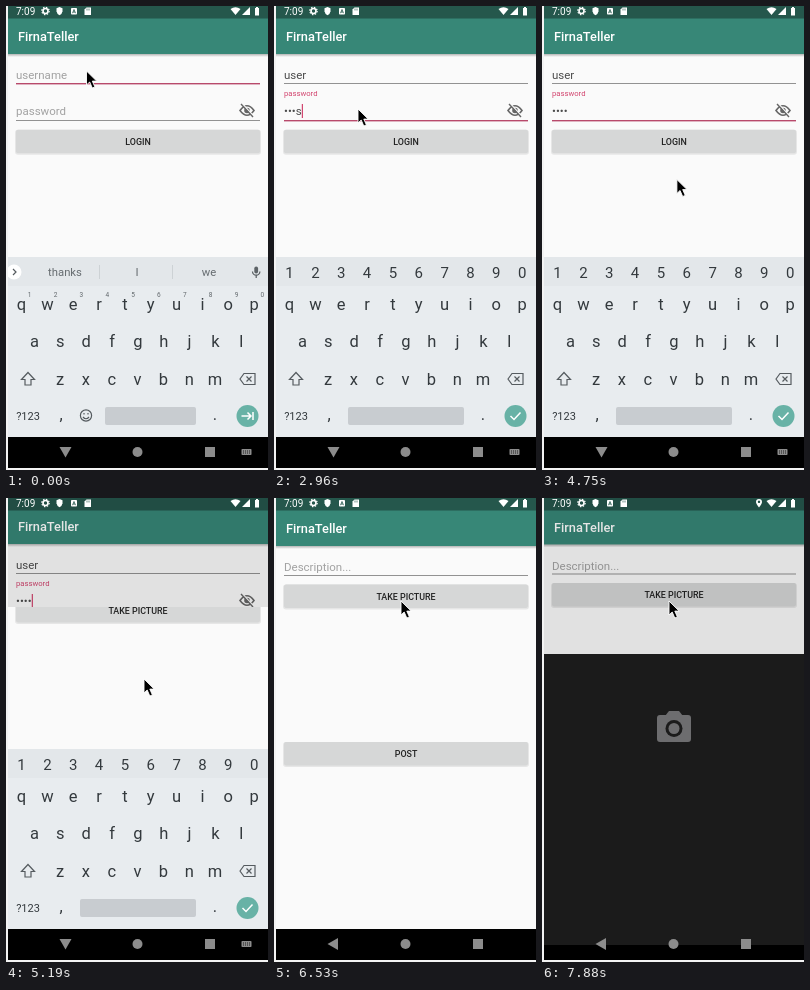
Recreate the animation shown at these times as an HTML page. Size 262 by 464 pixels, loop 8 s.

```html
<!DOCTYPE html>
<html lang="en">
<head>
<meta charset="utf-8">
<title>Login demo</title>
<style>
html, body { margin: 0; width: 100%; height: 100%; overflow: hidden; background: #f3f3f3; }
svg { display: block; width: 262px; height: 464px; font-family: Roboto, "Noto Sans", sans-serif; }
text { white-space: pre; }
.title { font-size: 12.8px; font-weight: 500; fill: #fff; }
.field { font-size: 11.5px; fill: #4c4c4c; }
.hint { font-size: 11.5px; fill: #a2a2a2; }
.caption { font-size: 8.9px; font-weight: 500; fill: #222; text-anchor: middle; }
.key { font-size: 16.5px; fill: #33393d; text-anchor: middle; }
.digit { font-size: 15px; fill: #33393d; text-anchor: middle; }
.sup { font-size: 6.5px; fill: #62686c; text-anchor: middle; }
.word { font-size: 11.3px; fill: #666c70; text-anchor: middle; }
.icon { fill: none; stroke: #555b5f; stroke-width: 1.2; }
.caret { fill: #d2456f; }
</style>
</head>
<body>
<svg viewBox="0 0 262 464">
  <defs>
    <linearGradient id="shade" x2="0" y2="1">
      <stop stop-color="#000" stop-opacity=".28"/>
      <stop offset="1" stop-color="#000" stop-opacity="0"/>
    </linearGradient>
    <clipPath id="phone"><rect x="2" width="260" height="462"/></clipPath>
    <clipPath id="reveal"><rect id="revealBox" x="2" width="260" height="464"/></clipPath>
    <g id="appBar">
      <rect x="2" y="-10" width="260" height="58" fill="#378777"/>
      <rect x="2" y="48" width="260" height="3" fill="url(#shade)"/>
      <text class="title" x="12" y="35.3">FirnaTeller</text>
    </g>
  </defs>

  <g clip-path="url(#phone)">
    <rect x="2" width="260" height="464" fill="#fafafa"/>

    <g id="login">
      <rect x="2" y="0" width="260" height="464" fill="#fafafa"/>
      <use href="#appBar"/>
      <text id="userHint" class="hint" x="10" y="73">username</text>
      <text id="user" class="field" x="10" y="73"></text>
      <rect id="compose" x="10" y="74" height="1" fill="#555"/>
      <rect id="userLine" x="10" width="244"/>
      <rect id="userCaret" class="caret" y="61" width="1.2" height="15"/>
      <text id="passHint" x="10">password</text>
      <text id="pass" class="field" x="10" y="108.5"></text>
      <rect id="passLine" x="10" width="244"/>
      <rect id="passCaret" class="caret" y="98" width="1.2" height="14"/>
      <g fill="none" stroke="#666" stroke-width="1.6">
        <path d="M234 104.5q7-9.5 14 0q-7 9.500-14 0z"/>
        <circle cx="241" cy="104.500" r="2" fill="#666"/>
        <path d="M236 97.500l12 13" stroke="#fafafa" stroke-width="1.500"/>
        <path d="M235 98l12 13" stroke-width="1.400"/>
      </g>
      <g id="loginButton"></g>
    </g>

    <g id="post">
      <g id="postBody">
        <rect x="2" width="260" height="464" fill="#fafafa"/>
        <use href="#appBar"/>
        <text class="hint" x="10" y="73">Description...</text>
        <rect x="10" y="77" width="244" height="1" fill="#929292"/>
        <g id="takeButton"></g>
        <g id="postButton"></g>
      </g>
    </g>
    <rect id="dim" x="2" width="260" height="464" opacity=".1"/>
    <use id="front" href="#post"/>

    <g id="keyboard">
      <rect x="2" y="251" width="260" height="180" fill="#e8ecef"/>
      <rect x="2" y="251" width="260" height="29" fill="#e3e7ea"/>
      <g id="letters"></g>
      <g id="wordKeys">
        <g id="sups"></g>
        <circle cx="8" cy="266" r="7.500" fill="#fff"/>
        <path class="icon" d="M7 263l3 3-3 3"/>
        <path d="M93.500 259v14M166.500 259v14" stroke="#cdd2d5"/>
        <text class="word" x="59" y="270"></text>
        <text class="word" x="131" y="270"></text>
        <text class="word" x="203" y="270"></text>
        <rect x="248.300" y="260.500" width="3.800" height="7" rx="1.900" fill="#5d6367"/>
        <path class="icon" d="M246.500 265.500a3.700 3.700 0 0 0 7.400 0M250.200 269v3"/>
        <g class="icon">
          <circle cx="80" cy="409.500" r="5.600"/>
          <path d="M77 411q3 3.500 6 0M78 407v1.600M82 407v1.600"/>
        </g>
      </g>
      <g id="digits"></g>
      <path class="icon" d="M22 366.500l6.500 7h-3.500v5.500h-6v-5.500h-3.500z"/>
      <path class="icon" d="M234 373l4-5.500h11v11h-11zM240.500 370.500l5 5M245.500 370.500l-5 5"/>
      <text x="22" y="413.500" class="word" style="fill:#33393d;font-size:11px">?123</text>
      <text x="55" y="414" class="key">,</text>
      <text x="209" y="414" class="key">.</text>
      <rect id="space" y="401" height="18" rx="2" fill="#c8ccd0"/>
      <circle cx="241.500" cy="410" r="11" fill="#68b2a6"/>
      <path id="action" fill="none" stroke="#fff" stroke-width="1.500"/>
    </g>

    <g id="camera">
      <rect x="2" y="156" width="260" height="291" fill="#1b1b1b"/>
      <rect x="115" y="217" width="34" height="27" rx="3" fill="#6d6d6f"/>
      <path d="M123 218l4-5h10l4 5z" fill="#6d6d6f"/>
      <circle cx="132" cy="230.500" r="8.500" fill="#1b1b1b"/>
      <circle cx="132" cy="230.500" r="5.500" fill="#6d6d6f"/>
    </g>

    <rect id="navBack" x="2" y="431" width="260" height="31"/>
    <g fill="#8c8c8c">
      <path id="back"/>
      <circle cx="131.500" cy="446" r="5"/>
      <rect x="199" y="441" width="10" height="10"/>
      <g id="switcher">
        <rect x="235.500" y="443" width="10" height="6" rx=".8"/>
        <path d="M237 445h7M237 447h7" stroke="#000" stroke-width=".8" stroke-dasharray="1 1"/>
      </g>
    </g>

    <rect id="status" x="2" width="260" height="12.500"/>
    <g fill="#fff">
      <text x="10" y="9" font-size="10">7:09</text>
      <circle cx="39.500" cy="5" r="2.500" fill="none" stroke="#fff" stroke-width="1.600"/>
      <circle cx="39.500" cy="5" r="3.700" fill="none" stroke="#fff" stroke-width="1.200" stroke-dasharray="1.450 1.450"/>
      <path d="M50.500 2.200l3-1.200 3 1.200v3q-.5 3-3 4-2.500-1-3-4z"/>
      <rect x="65" y="2" width="6" height="6.500" rx=".8"/>
      <path d="M66.500 7.200l1.500-3.700 1.500 3.700M67 6h2" fill="none" stroke="#25574c" stroke-width=".8"/>
      <path d="M80.500 1.500h4.500v7.500h-6.500v-5.500z"/>
      <path d="M81 2.500v2M83 2.500v2" stroke="#25574c" stroke-width=".7"/>
      <path d="M224.500 3q5-3.500 10 0l-5 6z"/>
      <path d="M244 1v8h-8z"/>
      <path d="M249 2h1v-1h2v1h1v7.500h-4z"/>
      <path id="pin" fill-rule="evenodd" d="M217 9.500q-3-4-3-5.500a3 3 0 0 1 6 0q0 1.500-3 5.500zM217 2.600a1.200 1.200 0 1 0 .01 0z"/>
    </g>
  </g>
  <rect y="462" width="262" height="2" fill="#f3f3f3"/>
  <path id="mouse" d="M0 0v14l3.200-3 2.600 6 2.600-1.100-2.600-5.800h4.400z" stroke="#fff" stroke-width=".9"/>
</svg>

<script>
const LOOP = 8000, STEP = 150;
const $ = id => document.getElementById(id);
const set = (el, attrs) => { for (const k in attrs) el.setAttribute(k, attrs[k]); };
const show = (id, on) => { $(id).style.display = on ? "" : "none"; };

// Latest value of a track of [time, value] pairs.
const at = (t, track) => track.reduce((v, [from, next]) => t >= from ? next : v, track[0][1]);

// Keyboard
const keyX = (i, start) => start + i * 25.85;
const label = (cls, x, y, s) => `<text class="${cls}" x="${x}" y="${y}">${s}</text>`;
const row = (cls, chars, start, y) =>
  [...chars].map((c, i) => label(cls, keyX(i, start), y, c)).join("");
$("letters").innerHTML = row("key", "qwertyuiop", 15.5, 303.5) +
  row("key", "asdfghjkl", 28.5, 340.5) + row("key", "zxcvbnm", 54, 378.5);
$("sups").innerHTML = row("sup", "1234567890", 23.7, 291.3);
$("digits").innerHTML = row("digit", "1234567890", 15.5, 271.5);

// Buttons
function button(id, y, name) {
  $(id).innerHTML = `
    <rect class="lift" x="9" y="${y}" width="246" height="25" rx="3" opacity=".08"/>
    <rect x="10" y="${y}" width="244" height="23.5" rx="2" fill="#d6d7d7"/>
    <rect class="press" x="10" y="${y}" width="244" height="23.5" rx="2" opacity="0"/>
    <rect class="wave" y="${y}" height="23.500" opacity="0"/>` +
    label("caption", 132, y + 15, name);
}
button("loginButton", 123.7, "LOGIN");
button("takeButton", 86.5, "TAKE PICTURE");
button("postButton", 244, "POST");

function ripple(id, [press, wave, left, right]) {
  const b = $(id);
  set(b.querySelector(".press"), { opacity: press });
  set(b.querySelector(".wave"), { opacity: wave, x: left, width: right - left });
  set(b.querySelector(".lift"), { opacity: press ? .16 : .08 });
}
const IDLE = [0, 0, 10, 254];
const tap = (start, left, right) => [
  [0, IDLE],
  [start, [.07, .12, left, right]],
  [start + STEP, [.07, .1, 10, 254]],
  [start + 2 * STEP, IDLE]
];

// Pointer moves: start, number of steps, end point.
const HOME = [80.5, 65];
const MOVES = [[1470, 3, 84, 103], [3250, 4, 118, 133], [4450, 4, 138, 181], [6080, 4, 127, 103]];
function pointer(t) {
  let [x, y] = HOME;
  for (const [start, n, ex, ey] of MOVES) {
    if (t < start) break;
    const p = Math.min(1, (Math.floor((t - start + 2) / STEP) + 1) / n);
    const e = p * p * (3 - 2 * p);
    x += (ex - x) * e;
    y += (ey - y) * e;
  }
  return [x, y];
}

const USER = [[0, ""], [740, "u"], [880, "use"], [1030, "user"]];
const WORDS = [[0, "thanks I we"], [740, "u you up"], [880, "use used user"], [1030, "user username users"]];
const PASS = [[0, ""], [2370, "p"], [2660, "•a"], [2810, "••s"], [2960, "•••s"], [4300, "••••"]];
const USER_CARET = [[0, 0], [440, 1], [1470, 0]];
const PASS_CARET = [[0, 0], [2070, 1], [3250, 0], [3700, 1], [4450, 0], [4900, 1]];
const FLOAT = [[0, 0], [1920, .5], [2070, 1]];

// Opening of the second screen: clip top and vertical offset.
const OPEN = [[0, [464, 0]], [5190, [109, 14.5]], [5340, [40, 2]], [5480, [0, 0]]];
const KEYS_DOWN = [[0, 0], [5340, 95], [5480, 180]];

function underline(id, y, active) {
  set($(id), { y, height: active ? 1.4 : 1, fill: active ? "#b84a6b" : "#929292" });
}

function caret(id, textId, on) {
  show(id, on);
  set($(id), { x: 10.2 + $(textId).getComputedTextLength() });
}

function drawLogin(t) {
  const name = at(t, USER), onPass = t >= 1920, f = at(t, FLOAT);
  $("user").textContent = name;
  $("pass").textContent = at(t, PASS);
  show("userHint", !name);
  show("compose", name && !onPass);
  set($("compose"), { width: $("user").getComputedTextLength() });
  underline("userLine", 77, !onPass);
  underline("passLine", 114, onPass);
  caret("userCaret", "user", at(t, USER_CARET));
  caret("passCaret", "pass", at(t, PASS_CARET));
  set($("passHint"), {
    y: 108.5 - 18.5 * f, "font-size": 11.5 - 3.8 * f, fill: onPass ? "#d2456f" : "#a2a2a2"
  });
  ripple("loginButton", at(t, tap(4000, 22, 233)));
}

function drawKeyboard(t) {
  const digits = t >= 2070, left = digits ? 74 : 99;
  show("keyboard", t < 5480);
  set($("keyboard"), { transform: `translate(0 ${at(t, KEYS_DOWN)})` });
  show("digits", digits);
  show("wordKeys", !digits);
  const words = at(t, WORDS).split(" ");
  $("wordKeys").querySelectorAll(".word").forEach((el, i) => el.textContent = words[i]);
  set($("space"), { x: left, width: 190 - left });
  set($("action"), { d: digits ? "M236.5 410l3.5 3.500 6.500-7" : "M235.500 410h9M241.500 406.500l3.500 3.500-3.500 3.500M247 406v8" });
}

function render(t) {
  const [top, drop] = at(t, OPEN), opening = t >= 5190 && t < 5480, camera = t >= 7880;
  drawLogin(t);
  drawKeyboard(t);
  show("login", t < 5480);
  set($("login"), { transform: `translate(0 ${opening ? -2 : 0})` });

  show("post", t >= 5480);
  show("front", false);
  set($("postBody"), { transform: `translate(0 ${camera ? -1.5 : drop})` });
  if (opening) {
    show("post", true);
    set($("post"), { "clip-path": "url(#reveal)" });
    set($("revealBox"), { y: top });
  } else $("post").removeAttribute("clip-path");
  show("dim", opening || camera);
  set($("dim"), { height: opening ? top : 156 });
  ripple("takeButton", at(t, tap(6980, 40, 222)));

  show("camera", camera);
  set($("navBack"), { y: camera ? 447 : 431 });
  set($("status"), { fill: opening || camera ? "#214d44" : "#25574c" });
  show("pin", t >= 7730);
  show("switcher", t < 5480);
  set($("back"), { d: t < 5480 ? "M53.500 441h12l-6 10.500z" : "M64 440v12l-10.500-6z" });
  set($("mouse"), { transform: `translate(${pointer(t)})` });
}

const begin = performance.now();
function tick() {
  render((performance.now() - begin) % LOOP);
  requestAnimationFrame(tick);
}
tick();
</script>
</body>
</html>
```
